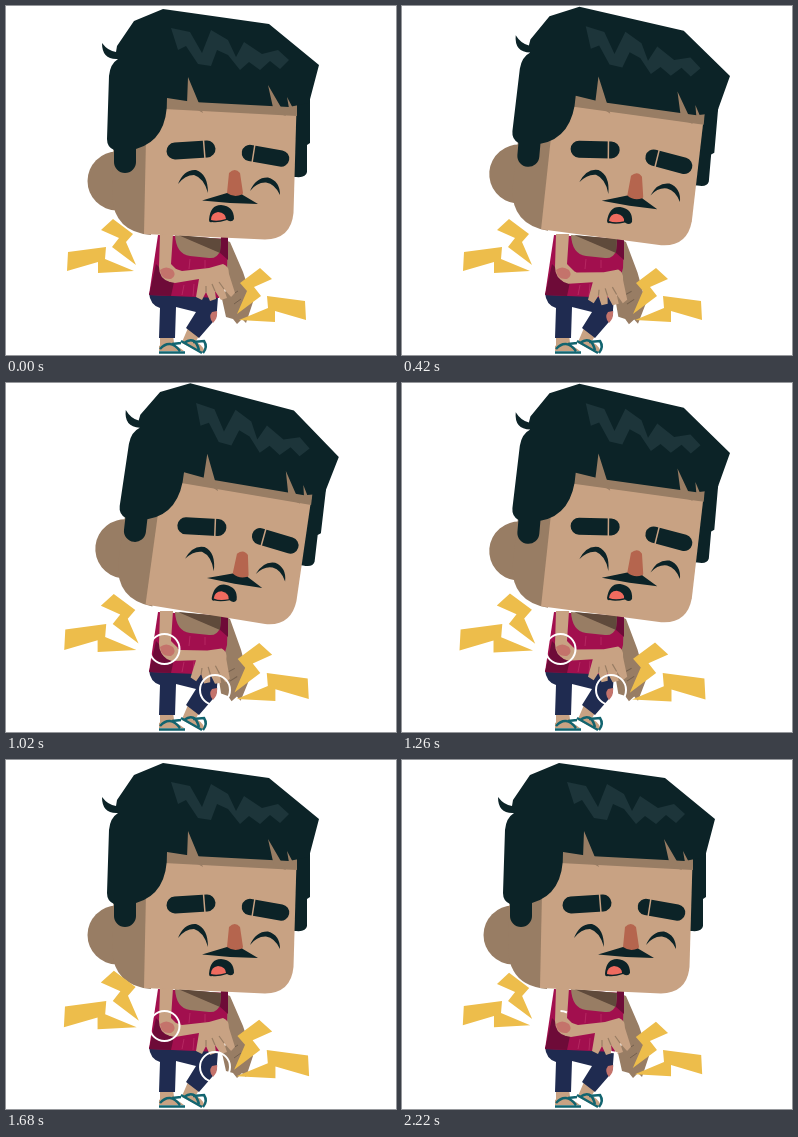
Write an HTML page that moves like this. It is 390x349 px and loops after 2250 ms.

```html
<!DOCTYPE html>
<html lang="en">
<head>
<meta charset="utf-8">
<title>Joint pain</title>
<style>
  html, body { margin: 0; width: 100%; height: 100%; overflow: hidden; background: #fff; }
  svg { display: block; width: 390px; height: 349px; }
  .hair { fill: #0c2327; }
  .shine { fill: #1d353a; }
  .skin { fill: #c8a283; }
  .shade { fill: #987d64; }
  .shirt { fill: #a20f4e; }
  .fold { fill: #6e0b38; }
  .pants { fill: #1f2b50; }
  .sore { fill: #c4736b; }
  .bolt { fill: #edbd4b; }
  .line { fill: none; stroke: #0c2327; stroke-linecap: round; }
  .strap { fill: none; stroke: #12646f; stroke-width: 2.5; }
  .ring { fill: none; stroke: #fff; stroke-width: 2; }
  .crease { fill: none; stroke: #987d64; stroke-width: 1.2; }
</style>
</head>
<body>
<svg viewBox="0 0 390 349">
  <g id="legs">
    <path class="skin" d="M154 329H167L169 344H154ZM182 322L193 330L186 342L176 336Z"/>
    <path class="skin" d="M153 340Q163 333 178 345H153ZM176 337L184 333Q197 338 199 346H193Z"/>
    <path class="strap" d="M153 346.500H179M154 343Q164 332 174 345M166 338L175 337M175 335L196 347M178 337Q189 329 193 344M187 336L198 335Q202 341 197 347"/>
    <path class="pants" d="M143 287L212 291L211 304Q212 311 206 317L193 332L180 322L190 306L170 301L169 332H153L154 302Q144 299 143 287Z"/>
    <path class="sore" d="M211 305Q212 312 207 317Q202 311 206 306Z"/>
  </g>

  <g id="farArm">
    <path class="shade" d="M219 234L224 236L237 266L247 296L240 317L236 313L231 318L227 313L220 311L216 293L222 280Z"/>
    <path d="M224 290L232 285M228 298L235 293" fill="none" stroke="#75604d"/>
  </g>

  <path class="shirt" d="M152 229L222 233L221 262L213 292L143 289Z"/>
  <path class="fold" d="M150 258L168 276L165 290L143 289ZM222 231V254L213 246L215 231Z"/>
  <path d="M178 279L176 289M188 278L187 290M198 278L197 290M184 253L183 263M199 254V262" fill="none" stroke="#b52761"/>
  <path class="shade" d="M169 229L215 233L214 245Q211 253 203 252L184 250Q170 248 169 229Z"/>
  <path d="M172 229L215 233L214 247Z" fill="#5f4a3b"/>
  <path class="skin" d="M154 228H167L165 258L172 265L164 276Q153 273 153 261Z"/>
  <g id="nearArm">
    <path class="skin" d="M156 264Q165 260 176 265L203 262L217 258Q223 260 223 268L229 287L225 291L218 283L221 292L215 294L209 285L210 293L204 295L200 286L196 294L190 291L193 273L169 277Q158 276 156 264Z"/>
    <path class="crease" d="M209 285L206 278M218 283L213 276M200 286V280"/>
  </g>
  <path class="sore" d="M154 264Q160 259 167 264Q171 270 165 273Q155 274 154 264Z"/>

  <g id="head">
    <path class="hair" d="M280 80L304 92L304 137L301 139L301 166Q300 172 290 171H280Z"/>
    <circle class="shade" cx="111" cy="175" r="29.500"/>
    <path class="shade" d="M108 120H145V229Q108 226 106 190Z"/>
    <path class="skin" d="M141 85H291L287.500 207Q285 233 259 233.500L138 228Z"/>
    <path class="shade" d="M158 88L291 95V110L158 103Z"/>
    <path class="hair" d="M112 53Q96 54 96 37Q102 45 110 46L111 40L128 15L157 3L263 18L313 59L303 97L283 101L187 96L161 92Q162 134 130 143V156A11 11 0 0 1 108 156V144Q101 141 101 133L103 70Q104 58 112 53Z"/>
    <path class="shade" d="M182 71L197 107L181 98ZM262 79L280 110L268 106ZM281 91L290 108H284Z"/>
    <path class="shine" d="M165 22L184 26L196 47L205 24L222 34L230 51L238 36L256 48L272 44L283 54L274 63L264 55L254 64L243 56L234 64L222 49L211 44L205 60L192 58L180 40L172 44Z"/>

    <path class="line" stroke-width="17" d="M169 145L201 143"/>
    <path class="line" stroke-width="16.500" d="M244 147L275 152.500"/>
    <path d="M197.500 134L199 153M249 138L246 157" stroke="#c8a283" stroke-width="1.500"/>
    <path class="hair" d="M172 178Q178 163 190 164Q202 168 202 187Q198 172 188 169Q179 169 172 178ZM244 185Q250 171 262 171.500Q274 175 274 189Q269 178 260 176.500Q251 176 244 185Z"/>
    <path d="M223 167Q229 161 234 167L237 187Q236 192 228 191Q221 191 221 187Z" fill="#b5654e"/>
    <path class="hair" d="M196 194.500L221 187Q228 192 236 188.500L252 198L224 197Z"/>
    <path class="hair" d="M203 214Q204 199 215 199Q228 200 228 213Q226 217 221 214Q212 217 206 216Q203 217 203 214Z"/>
    <path d="M205 214Q205 207 212 206Q220 207 220 213Q211 216 205 214Z" fill="#ef6b5f"/>
  </g>

  <g id="leftBolts" class="bolt">
    <g id="bolts">
      <path d="M107 213L127 228L120 236L130 259L106 241L113 232L95 224Z"/>
      <path d="M62 246L100 241L99 253L128 265L92 267V256L61 265Z"/>
    </g>
  </g>
  <g id="rightBolts" class="bolt">
    <use href="#bolts" transform="translate(361 49) scale(-1 1)"/>
  </g>
  <circle class="ring" cx="158.500" cy="266" r="15" pathLength="100" transform="rotate(-90 158.500 266)"/>
  <circle class="ring" cx="209" cy="307" r="15" pathLength="100" transform="rotate(-90 209 307)"/>
</svg>
<script>
  const LOOP = 2250, STEP = 30;
  const byId = id => document.getElementById(id);
  const rings = document.querySelectorAll('.ring');

  // Rises from 0 to 1 and falls back to 0 between two times.
  const swell = (t, from, to) =>
    t <= from || t >= to ? 0 : Math.sin(Math.PI * (t - from) / (to - from));
  const rotate = (id, angle, x, y) =>
    byId(id).setAttribute('transform', `rotate(${angle} ${x} ${y})`);
  const scale = (id, k, x, y) =>
    byId(id).setAttribute('transform', `translate(${x} ${y}) scale(${k}) translate(${-x} ${-y})`);

  function draw(now) {
    const t = Math.floor(now % LOOP / STEP) * STEP;
    const tilt = swell(t, 0, 1680);
    const pain = swell(t, 540, LOOP);

    rotate('head', 7 * tilt, 194, 238);
    rotate('nearArm', 8 * tilt, 160, 252);
    rotate('farArm', 4 * tilt, 225, 236);
    scale('leftBolts', 1 + 0.1 * pain, 97, 240);
    scale('rightBolts', 1 + 0.1 * pain, 264, 289);

    const drawn = Math.min(100, 130 * pain);
    for (const ring of rings) {
      ring.style.strokeDasharray = drawn < 100 ? `${drawn} 200` : 'none';
      ring.style.visibility = drawn > 0 ? 'visible' : 'hidden';
    }
    requestAnimationFrame(draw);
  }
  draw(performance.now());
</script>
</body>
</html>
```
